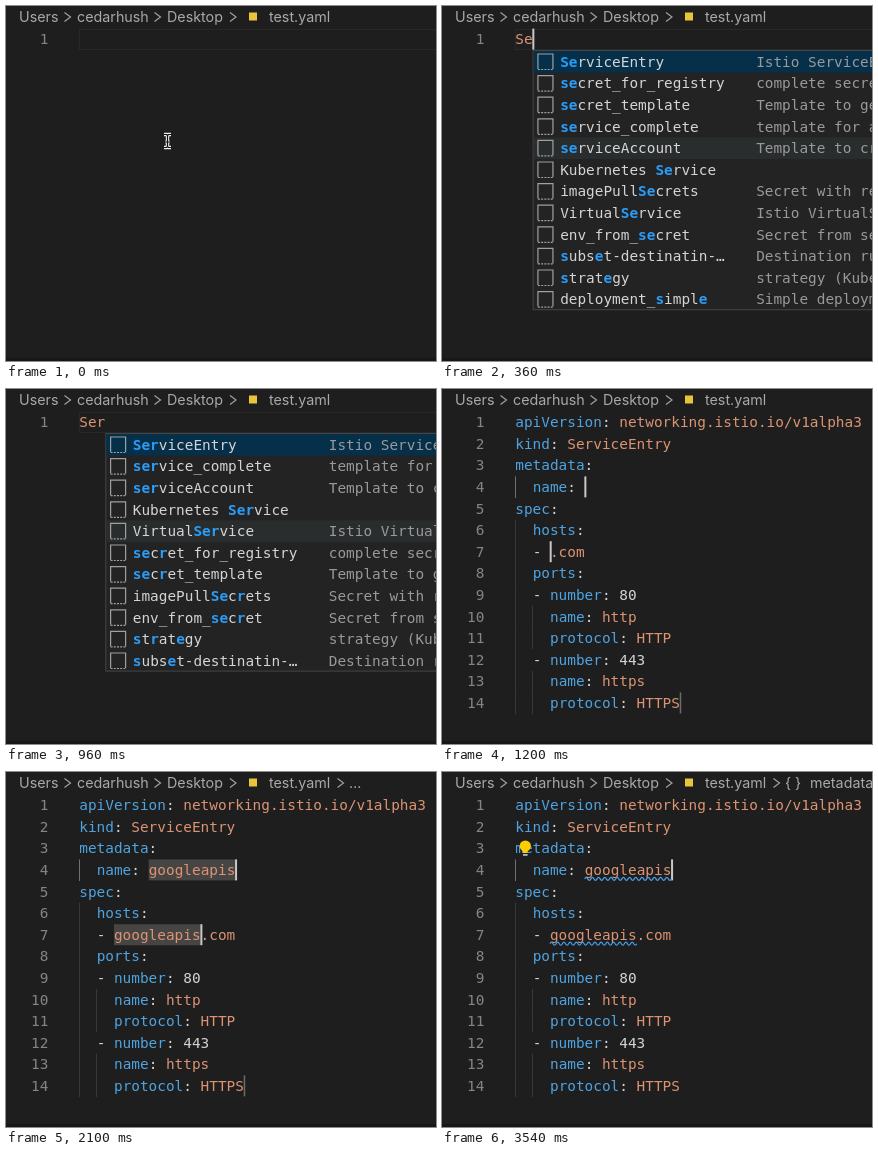
Animation, 430 px wide and 355 px high, one loop 3600 ms. Source, as an HTML page:

```html
<!DOCTYPE html>
<html lang="en">
<head>
<meta charset="utf-8">
<title>YAML snippet completion</title>
<style>
  html, body { margin: 0; width: 100%; height: 100%; overflow: hidden; background: #1e1e1e; }
  svg { display: block; }
  text { white-space: pre; font: 14.4px "DejaVu Sans Mono", monospace; fill: #d4d4d4; }
  .crumb { font: 14.3px Inter, sans-serif; fill: #a9a9a9; }
  .num { fill: #858585; text-anchor: end; }
  .key { fill: #4fa3e0; }
  .str { fill: #dc9373; }
  .hit { fill: #2a9df8; font-weight: bold; }
  .detail { fill: #999; }
  .line { fill: none; stroke: #a0a0a0; stroke-width: 1.2; }
  .squiggle { fill: none; stroke: #46a3f0; stroke-width: 1.2; }
</style>
</head>
<body>
<svg id="stage" width="430" height="355" viewBox="0 0 430 355"></svg>
<script>
const LOOP = 3600, CELL = 8.67, ROW = 21.6, LEFT = 73.3;
const stage = document.getElementById('stage');
const scenes = [];

function add(parent, tag, attrs, content) {
  const node = document.createElementNS('http://www.w3.org/2000/svg', tag);
  for (const name in attrs) node.setAttribute(name, attrs[name]);
  if (content !== undefined) node.textContent = content;
  return parent.appendChild(node);
}

// A layer visible from one time up to another
function scene(from, to = LOOP) {
  const node = add(stage, 'g', {});
  scenes.push({ node, from, to });
  return node;
}

const rect = (g, x, y, width, height, fill) => add(g, 'rect', { x, y, width, height, fill });
const path = (g, d, cls) => add(g, 'path', { d, class: cls });
const colX = col => LEFT + col * CELL;
const rowTop = line => 22.6 + (line - 1) * ROW;
const base = line => rowTop(line) + 15.5;

function runs(g, x, y, parts) {
  const text = add(g, 'text', { x, y });
  for (const [content, cls] of parts) add(text, 'tspan', { class: cls }, content);
}

const crumb = (g, x, label) => add(g, 'text', { x, y: 16, class: 'crumb' }, label);
const chevron = (g, x) => path(g, `M${x} 6.5l6 4.5-6 4.5`, 'line');
const lineNumber = (g, n) => add(g, 'text', { x: 42.3, y: base(n), class: 'num' }, n);
const caret = (g, line, col) => rect(g, colX(col) - 0.3, rowTop(line), 2, 21, '#c8c8c8');

function codeLine(g, n, source) {
  const [, indent, dash, key, value] = source.match(/^( *)(- )?(?:(\w+):)? ?(.*)$/);
  const parts = [[dash || '', '']];
  if (key) parts.push([key, 'key'], [': ', '']);
  parts.push([value, /^\d+$/.test(value) ? '' : 'str']);
  runs(g, colX(indent.length), base(n), parts);
}

function popup(g, typed, rows) {
  const x = colX(typed) + 0.5, top = 45, height = rows.length * ROW;
  rect(g, x, top - 0.5, 500, height, '#232324').setAttribute('stroke', '#454545');
  rect(g, x + 0.5, top, 500, ROW, '#062f4a');
  rect(g, x + 0.5, top + 4 * ROW, 500, ROW, '#2a2d2e');
  rows.forEach(([label, detail], i) => {
    const y = top + i * ROW;
    path(g, `M${x + 4.8} ${y + 18}v-15h15v15`, 'line').setAttribute('stroke', '#c5c5c5');
    path(g, `M${x + 4.8} ${y + 18.5}h15.5`, 'line').setAttribute('stroke-dasharray', '2 1.2');
    runs(g, x + 27, y + 15.7, label.split('*').map((s, k) => [s, k % 2 ? 'hit' : '']));
    add(g, 'text', { x: x + 223, y: y + 15.7, class: 'detail' }, detail);
  });
}

const details = {
  ServiceEntry: 'Istio ServiceEntry',
  secret_for_registry: 'complete secret for registry',
  secret_template: 'Template to get secret',
  service_complete: 'template for a service',
  serviceAccount: 'Template to create account',
  imagePullSecrets: 'Secret with registry',
  VirtualService: 'Istio VirtualService',
  env_from_secret: 'Secret from secret',
  'subset-destinatin-…': 'Destination rule subset',
  strategy: 'strategy (Kubernetes)',
  deployment_simple: 'Simple deployment'
};
const list = labels => labels.map(s => [s, details[s.replaceAll('*', '')] || '']);

const forSe = ['*Se*rviceEntry', '*se*cret_for_registry', '*se*cret_template', '*se*rvice_complete',
  '*se*rviceAccount', 'Kubernetes *Se*rvice', 'imagePull*Se*crets', 'Virtual*Se*rvice',
  'env_from_*se*cret', '*s*ubs*e*t-destinatin-…', '*s*trat*e*gy', 'deployment_*s*impl*e*'];
const forS = forSe.map(s => s.replace(/\*(s)e\*/i, '*$1*e').replace('*e*', 'e'));
const forSer = ['*Ser*viceEntry', '*ser*vice_complete', '*ser*viceAccount', 'Kubernetes *Ser*vice',
  'Virtual*Ser*vice', '*se*c*r*et_for_registry', '*se*c*r*et_template', 'imagePull*Se*c*r*ets',
  'env_from_*se*c*r*et', '*s*t*r*at*e*gy', '*s*ubs*e*t-destinatin-…'];

// Breadcrumbs
const frame = scene(0);
crumb(frame, 13, 'Users');
crumb(frame, 71, 'cedarhush');
crumb(frame, 161, 'Desktop');
crumb(frame, 263, 'test.yaml');
[58.5, 148.5, 224].forEach(x => chevron(frame, x));
rect(frame, 243, 6.5, 8, 8, '#e8c33c');
rect(frame, 0, 352, 430, 3, '#1a1516');
lineNumber(frame, 1);

const more = scene(1800, 2400);
chevron(more, 331.5);
crumb(more, 343, '…');
const symbol = scene(2400);
chevron(symbol, 331.5);
crumb(symbol, 343, '{ }');
crumb(symbol, 368, 'metadata');

// Empty file, then the typed prefix
add(scene(0, 1200), 'rect', { x: 73.5, y: 23.5, width: 400, height: 20, fill: 'none', stroke: '#282828' });
const pointer = scene(0, 60);
const beam = 'M158 128.5h2.5l1 1 1-1h2.5M161.5 129.5v11M158 141.5h2.5l1-1 1 1h2.5M159.5 136h4';
add(pointer, 'path', { d: beam, fill: 'none', stroke: '#eee', 'stroke-width': 3.4 });
add(pointer, 'path', { d: beam, fill: 'none', stroke: '#111', 'stroke-width': 1.2 });

[['S', 60, 240, 240], ['Se', 240, 540, 540], ['Ser', 540, 1200, 900]].forEach(([word, from, to, blink]) => {
  runs(scene(from, to), LEFT, base(1), [[word, 'str']]);
  caret(scene(from, blink), 1, word.length);
});
popup(scene(120, 240), 1, list(forS));
popup(scene(240, 540), 2, list(forSe));
popup(scene(540, 1200), 3, list(forSer));

// Inserted snippet
const marks = scene(2100, 3180);
rect(marks, colX(8), rowTop(4), 10 * CELL, 21, '#474544');
rect(marks, colX(4), rowTop(7), 10 * CELL, 21, '#474544');

const snippet = scene(1200);
const guide = (line, col, fill) => rect(snippet, Math.floor(colX(col)), rowTop(line), 1, ROW, fill);
guide(4, 0, '#707070');
for (let n = 6; n <= 14; n++) guide(n, 0, '#383838');
[10, 11, 13, 14].forEach(n => guide(n, 2, '#383838'));
['apiVersion: networking.istio.io/v1alpha3', 'kind: ServiceEntry', 'metadata:', '  name: ', 'spec:',
  '  hosts:', '', '  ports:', '  - number: 80', '    name: http', '    protocol: HTTP',
  '  - number: 443', '    name: https', '    protocol: HTTPS'].forEach((source, i) => {
  if (i) lineNumber(snippet, i + 1);
  if (source) codeLine(snippet, i + 1, source);
});
codeLine(scene(1200, 1560), 7, '  - .com');
const filled = scene(1560);
codeLine(filled, 7, '  - googleapis.com');
runs(filled, colX(8), base(4), [['googleapis', 'str']]);

// Final tab stop and linked carets
rect(scene(1200, 3180), colX(19) - 0.3, rowTop(14), 1.5, 21, '#6c6c6c');
[[1200, 1560, 0], [1560, 2520, 10], [3000, 3180, 10]].forEach(([from, to, typed]) => {
  const g = scene(from, to);
  caret(g, 4, 8 + typed);
  caret(g, 7, 4 + typed);
});
caret(scene(3180), 4, 18);

// Diagnostics
const hints = scene(2580);
for (const [line, col] of [[4, 8], [7, 4]]) {
  path(hints, `M${colX(col)} ${rowTop(line) + 19.5}` + 'q1.55-3 3.1 0t3.1 0'.repeat(14), 'squiggle');
}
const bulb = scene(2700);
add(bulb, 'circle', { cx: 83.3, cy: 74, r: 5.6, fill: '#fc0' });
rect(bulb, 81, 78.5, 4.6, 2.5, '#fc0');
rect(bulb, 81, 82, 4.6, 1.8, '#b8b8b8');

const start = performance.now();
function draw() {
  const t = (performance.now() - start) % LOOP;
  for (const { node, from, to } of scenes) {
    node.style.display = t >= from && t < to ? '' : 'none';
  }
  requestAnimationFrame(draw);
}
draw();
</script>
</body>
</html>
```
